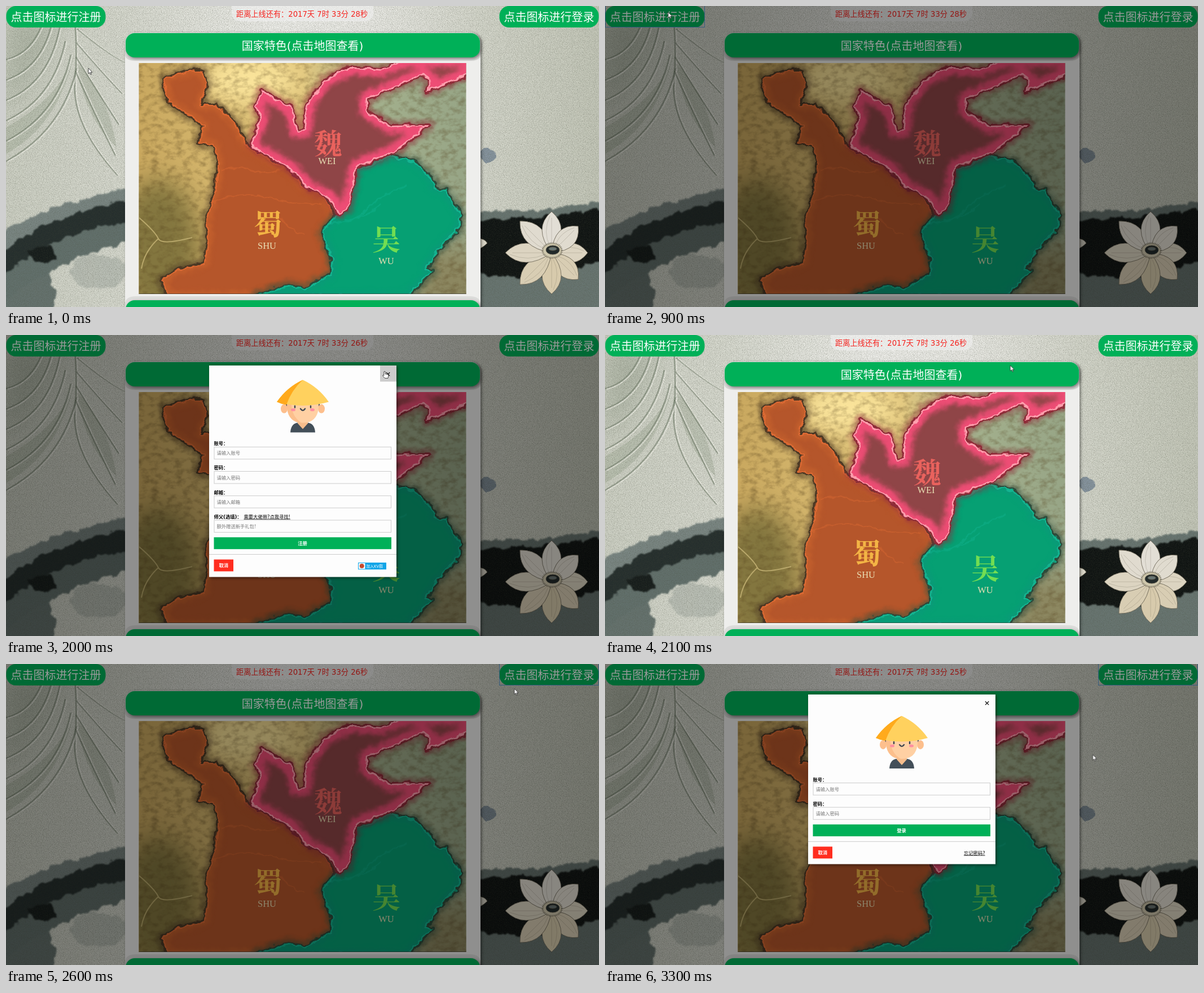
Recreate the animation shown at these times as an HTML page. Size 1051 by 533 pixels, loop 3.5 s.

```html
<!DOCTYPE html>
<html lang="zh-CN">
<head>
<meta charset="utf-8">
<title>三国</title>
<style>
html,body{margin:0;width:100%;height:100%;overflow:hidden;background:#c9cac2}
svg{display:block;width:100%;height:100%}
text{font-family:"DejaVu Sans","Noto Sans CJK SC","Noto Sans CJK",sans-serif}
.big{font-size:20px;fill:#fff}
.mid{text-anchor:middle}
.clock{font-size:13.2px;fill:#f5231f}
.form text{font-size:8.3px}
.form .b{font-weight:bold}
.form .hint{fill:#777}
.form .on{fill:#fff;text-anchor:middle}
.form .link{text-decoration:underline}
.glyph{font:bold 50px "Noto Serif CJK SC","Noto Sans CJK SC","Noto Sans CJK",serif;text-anchor:middle}
.latin{font:16.5px "Liberation Serif",serif;text-anchor:middle;fill:#e9dfb4}
</style>
</head>
<body>
<svg viewBox="0 0 1051 533" color-interpolation-filters="sRGB">
<defs>
  <linearGradient id="paper">
    <stop offset="0" stop-color="#cfd2c6"/><stop offset=".2" stop-color="#d9dbd1"/>
    <stop offset=".45" stop-color="#f0f0ec"/><stop offset=".62" stop-color="#ebebe6"/>
    <stop offset=".8" stop-color="#d6d8cd"/><stop offset="1" stop-color="#c6c9bb"/>
  </linearGradient>
  <linearGradient id="land">
    <stop offset="0" stop-color="#c9a85f"/><stop offset=".5" stop-color="#e0c57c"/>
    <stop offset=".72" stop-color="#a3b08d"/><stop offset="1" stop-color="#97a586"/>
  </linearGradient>
  <filter id="grain" x="0" y="0" width="1" height="1">
    <feTurbulence type="fractalNoise" baseFrequency=".9" numOctaves="2" seed="4"/>
    <feColorMatrix values="0 0 0 0 .28  0 0 0 0 .3  0 0 0 0 .24  1.7 0 0 0 -.68"/>
  </filter>
  <filter id="ridges" x="0" y="0" width="1" height="1">
    <feTurbulence type="fractalNoise" baseFrequency=".07 .11" numOctaves="4" seed="9"/>
    <feColorMatrix values="0 0 0 0 .32  0 0 0 0 .24  0 0 0 0 .1  2 0 0 0 -.85"/>
  </filter>
  <filter id="rough">
    <feTurbulence type="fractalNoise" baseFrequency=".08" numOctaves="2" seed="3"/>
    <feDisplacementMap in="SourceGraphic" scale="10" xChannelSelector="R" yChannelSelector="G"/>
  </filter>
  <filter id="ink" filterUnits="userSpaceOnUse" x="-40" y="290" width="1140" height="290">
    <feTurbulence type="fractalNoise" baseFrequency=".06" numOctaves="4" seed="7"/>
    <feDisplacementMap in="SourceGraphic" scale="16" xChannelSelector="R" yChannelSelector="G"/>
    <feGaussianBlur stdDeviation="1"/>
  </filter>
  <filter id="soft" x="-.5" y="-.5" width="2" height="2"><feGaussianBlur stdDeviation="22"/></filter>
  <filter id="glow"><feGaussianBlur stdDeviation="4"/></filter>
  <filter id="card" x="-.1" y="-.2" width="1.2" height="1.5">
    <feDropShadow dy="2" stdDeviation="2.6" flood-opacity=".45"/>
  </filter>
  <clipPath id="frame"><path d="M235.5 101h580v409h-580z"/></clipPath>
</defs>

<rect width="1051" height="533" fill="url(#paper)"/>
<g id="leaf" fill="none"></g>
<g filter="url(#ink)" fill="none">
  <circle cx="25" cy="515" r="62" fill="#66736f"/>
  <ellipse cx="165" cy="470" rx="50" ry="30" fill="#aab1a9" opacity=".6"/>
  <path d="M-20 505Q70 425 230 388" stroke="#63716d" stroke-width="52"/>
  <path d="M-20 432Q70 368 230 341" stroke="#7b8784" stroke-width="38"/>
  <path d="M-20 472Q60 388 230 360" stroke="#252e2d" stroke-width="36"/>
  <ellipse cx="65" cy="440" rx="24" ry="14" fill="#161c1b"/>
  <path d="M820 362Q950 368 1080 342V560H820z" fill="#697672"/>
  <path d="M820 378Q950 382 1080 352V440Q950 500 820 468z" fill="#0f1312"/>
</g>
<circle cx="853" cy="265" r="13" fill="#8795a0" filter="url(#rough)"/>
<rect width="1051" height="533" filter="url(#grain)" opacity=".5"/>
<g id="lotus" stroke="#655f50" stroke-width=".8"></g>

<rect x="400" y="-14" width="251" height="41" rx="14" fill="#f1f1f0" opacity=".6"/>
<g id="clock"></g>

<rect x="211" y="47" width="630" height="500" rx="18" fill="#eeeeec" filter="url(#card)"/>
<path d="M211 78V88Q213 97 230 97H822Q839 97 841 88V78z" fill="#d6d6d4"/>
<path d="M211 532V526Q213 514 230 514H822Q839 514 841 526V532z" fill="#dcdcda"/>
<g fill="#00b058" filter="url(#card)">
  <rect x="212" y="48" width="628" height="43" rx="16"/>
  <rect x="212" y="521" width="628" height="43" rx="16"/>
</g>
<text class="big mid" x="525.5" y="77.5">国家特色(点击地图查看)</text>

<g clip-path="url(#frame)">
  <rect x="235" y="100" width="581" height="411" fill="url(#land)"/>
  <g filter="url(#soft)">
    <ellipse cx="430" cy="130" rx="85" ry="45" fill="#fae49b"/>
    <ellipse cx="270" cy="430" rx="75" ry="125" fill="#83763f"/>
    <ellipse cx="790" cy="490" rx="75" ry="65" fill="#8c8760"/>
    <ellipse cx="620" cy="115" rx="75" ry="15" fill="#dcc68a"/>
  </g>
  <rect x="235" y="100" width="581" height="411" filter="url(#ridges)" opacity=".4"/>
  <path d="M236 375Q265 400 270 412T330 410M270 412Q245 435 240 465" fill="none" stroke="#b9a86b" stroke-width="2"/>
  <g id="realms"></g>
  <path d="M235 510.2h581" stroke="#1d1a16" stroke-width="1.6"/>
</g>
<text class="glyph" x="571" y="262" fill="#e9625d">魏</text><text class="latin" x="569" y="280">WEI</text>
<text class="glyph" x="464" y="405" fill="#f3b445">蜀</text><text class="latin" x="462.5" y="430">SHU</text>
<text class="glyph" x="674" y="432" fill="#72dd52">吴</text><text class="latin" x="674" y="457">WU</text>

<g id="tabs"></g>
<rect id="shade" width="1051" height="533" fill="#000" fill-opacity=".4"/>
<g id="signup" class="form" style="transform-origin:526px 241.3px"></g>
<g id="login" class="form" style="transform-origin:526px 203.7px"></g>
<g id="pointer" fill="#fff" stroke="#222" stroke-width=".8">
  <path id="arrow" d="M0 0V9.8L2.3 7.8 4 11.3 5.5 10.6 3.9 7.3H7z"/>
  <path id="hand" d="M-1.2 1Q0-.6 1.2 1V5L5.5 5.8Q7 6.2 6.8 8L6 12.5H.5L-3.2 8.5Q-3.8 7-2.5 7L-1.2 8z"/>
</g>
</svg>
<script>
const LOOP = 3500, TICK = 100;
const $ = id => document.getElementById(id);
const repeat = (n, make) => Array.from({length: n}, (_, i) => make(i)).join('');

// rows: [ms, value]; each value holds until the next row
function hold(el, prop, rows) {
  const keys = rows.map(([ms, v]) => ({offset: ms / LOOP, [prop]: v, easing: 'steps(1, end)'}));
  keys.push({offset: 1, [prop]: rows.at(-1)[1]});
  el.animate(keys, {duration: LOOP, iterations: Infinity});
}
function sample(el, valueAt) {
  hold(el, 'transform', Array.from({length: LOOP / TICK}, (_, i) => [i * TICK, valueAt(i * TICK)]));
}
function show(el, ...spans) {
  const rows = spans[0][0] > 0 ? [[0, 0]] : [];
  for (const [from, to] of spans) {
    rows.push([from, 1]);
    if (to < LOOP) rows.push([to, 0]);
  }
  hold(el, 'opacity', rows);
}

// Hanging leaf: two fans of veins along one stem
const vein = d => `<path d="${d}" stroke="#75806f" stroke-width="2.4" opacity=".6"/>
  <path d="${d}" transform="translate(3 1)" stroke="#f2f3ea" stroke-width="2" opacity=".7"/>`;
$('leaf').innerHTML =
  '<path d="M0 20H95Q60 130 0 190z" fill="#8d9884" opacity=".45" filter="url(#soft)"/>' +
  '<path d="M122 80Q95 210 0 262V215Q100 160 122 80zM124 100Q180 150 196 250Q140 200 124 100z" fill="#8b9781" opacity=".3"/>' +
  vein('M118-5Q128 60 122 135T198 300') +
  repeat(6, i => vein(`M${75 + i * 10} ${i * 24 - 10}Q${60 + i * 8} ${80 + i * 28} 0 ${95 + i * 36}`)) +
  repeat(4, i => vein(`M${126 - i} ${40 + i * 25}Q${180 - i * 8} ${85 + i * 35} ${212 - i * 6} ${100 + i * 55}`));

// Lotus: eight petals, longer to the left and warmer below
$('lotus').innerHTML = repeat(8, i => {
  const angle = i * 45, a = angle * Math.PI / 180, len = 73 - 9 * Math.cos(a);
  return `<g transform="translate(967 437) rotate(${angle})" fill="hsl(42 ${27 + 8 * Math.sin(a)}% ${81 - 5 * Math.sin(a)}%)">
    <path d="M0 0Q${len * .6} -34 ${len} 0Q${len * .6} 34 0 0"/>
    <path d="M0 0H${len * .85}M12-3Q${len * .5}-16 ${len * .9}-3" fill="none" opacity=".3"/></g>`;
}) + `<path d="M841 412Q850 414 853 420Q847 426 841 429z" fill="#d9d5c6"/>
  <ellipse cx="968" cy="433" rx="17" ry="13" fill="#cfc8ad" stroke-dasharray="1 1.5" stroke-width="3"/>
  <ellipse cx="969" cy="432" rx="12" ry="8" fill="#222a2a"/>
  <ellipse cx="969" cy="430" rx="7" ry="3" fill="#687573"/>`;

// Map: key points only, the rough filter frays the coasts
const shu = `M278 128 325 114 345 113 357 135 345 175 372 175 405 205 428 248 478 279 500 283 525 318 562 336
  583 371 559 400 578 450 575 475 530 500 445 514H290L275 487 300 468 352 455 358 400 355 380 372 320 376 275
  368 245 340 243 350 212 288 170z`;
const wu = `M608 350 622 290 680 265 725 275 760 310 757 322 780 327 806 370 803 395 768 430 745 465 757 470
  710 514H440L500 495 530 500 575 475 578 450 559 400 583 373z`;
const wei = `M452 150 505 178 517 220 528 218 535 170 565 130 610 108 665 112 705 95H822V120L745 152 752 130
  738 122 640 165 640 185 680 212 750 211 690 258 622 285 606 360 590 369 572 340 535 322 505 290 433 248
  452 195 442 180z`;
function realm(id, d, fill, glow, line, edge, depth, rivers = '') {
  return `<clipPath id="${id}"><path d="${d}"/></clipPath>
    <g filter="url(#rough)" stroke-linejoin="round" fill="none">
      <path d="${d}" stroke="${edge}" stroke-width="16" opacity=".55" filter="url(#glow)"/>
      <path d="${d}" fill="${fill}" stroke="${edge}" stroke-width="6"/>
      <g clip-path="url(#${id})">
        <path d="${d}" stroke="${glow}" stroke-width="${depth}" filter="url(#glow)"/>
        <path d="${rivers}" stroke="${line}" stroke-width="2.5" opacity=".4"/>
        <path d="${d}" stroke="${line}" stroke-width="5"/>
      </g>
    </g>`;
}
$('realms').innerHTML =
  realm('shu', shu, '#b5562b', '#c4602d', '#dc6933', '#4b3824', 16,
    'M380 292Q410 280 440 292T500 280M365 350Q410 325 455 338T560 350M485 375Q505 400 530 405') +
  realm('wu', wu, '#06a073', '#0a9a78', '#13b591', '#2d4a3a', 15,
    'M560 385Q610 390 640 360T710 320M600 380Q640 375 665 350') +
  realm('wei', wei, '#8f4547', '#ee4d75', '#ffa0ae', '#8e2c38', 28);

// Corner buttons
function tab(id, x, label) {
  const box = fill => `<rect x="${x}" width="176" height="38" rx="17" fill="${fill}"/>`;
  const text = fill => `<text class="big" x="${x + 8}" y="26.5" style="fill:${fill}">${label}</text>`;
  return box('#00b058') + text('#fff') + `<g id="${id}Hover">${box('#ccc') + text('#000')}</g>
    <rect id="${id}Focus" x="${x}" y="-.5" width="176" height="38" fill="none" stroke="#5b9bd2"/>`;
}
$('tabs').innerHTML = tab('join', .5, '点击图标进行注册') + tab('enter', 874.5, '点击图标进行登录');

// Dialogs
const mirror = shape => shape + `<g transform="scale(-1 1)">${shape}</g>`;
const face = y => `<g transform="translate(526 ${y})">
  <path d="M-22 93Q-21 78-10 76H10Q21 78 22 93z" fill="#434f59"/>
  <path d="M-9 65H9V77L0 87-9 77z" fill="#f6bd8c"/>
  ${mirror('<path d="M0 32H30V52H0z" fill="#434f59"/><ellipse cx="33" cy="51" rx="6" ry="8" fill="#fdbf8d"/>')}
  <path d="M-28 38H28V50Q25 76 0 76T-28 50z" fill="#ffd0a3"/>
  <path d="M-28 38H-20Q-21 65-2 76Q-25 75-28 50z" fill="#fcbf8c"/>
  <path d="M0 0Q28 13 46 39Q0 52-46 39Q-28 13 0 0z" fill="#ffd15e"/>
  <path d="M0 0Q-20 18-29 44-38 43-46 39-28 13 0 0z" fill="#ffaa1c"/>
  ${mirror('<ellipse cx="17" cy="53" rx="4" ry="2.5" fill="#ff8fa0"/>')}
  <path d="M-14 46v3M14 46v3M-4 51Q0 57 4 51" fill="none" stroke="#3d4650" stroke-width="2.4" stroke-linecap="round"/>
</g>`;
const field = (y, label, hint) => `<text class="b" x="368.5" y="${y - 2.8}">${label}</text>
  <rect x="369" y="${y + .3}" width="313.5" height="21.5" fill="#fdfdfd" stroke="#ccc"/>
  <text class="hint" x="373.5" y="${y + 14.3}">${hint}</text>`;
function dialog(top, fields, action, extra) {
  const pitch = 43.2, foot = top + fields.length * pitch + 17.7;
  return `<rect x="360" y="54" width="332" height="${foot - 14}" fill="#fdfdfd" filter="url(#card)"/>
    <rect class="closeHover" x="663" y="54" width="29" height="28.5" fill="#ccc" opacity="0"/>
    <path d="M674 66.2l6.2 6.2m0-6.2l-6.2 6.2" stroke="#111" stroke-width="1.3"/>
    ${face(top - 118.4)}${fields.map((f, i) => field(top + i * pitch, ...f)).join('')}
    <rect x="368.5" y="${foot - 30.3}" width="314.5" height="21" fill="#00b058"/>
    <text class="on b" x="525.5" y="${foot - 16.8}">${action}</text>
    <path d="M360 ${foot}h332" stroke="#ccc"/>
    <rect x="368.5" y="${foot + 9}" width="34.5" height="21" fill="#ff2d1f"/>
    <text class="on b" x="385.7" y="${foot + 22.5}">取消</text>${extra}`;
}
const account = [['账号：', '请输入账号'], ['密码：', '请输入密码']];
$('signup').innerHTML = dialog(198,
  [...account, ['邮箱：', '请输入邮箱'], ['师父(选填)：', '额外赠送新手礼包!']], '注册',
  `<text class="link" x="421.5" y="324.7">需要大佬带?点我寻找!</text>
  <rect x="624" y="403" width="50" height="12.2" fill="#10a5e8"/><path d="M625 404h11.5v10.2h-11.5z" fill="#fff"/>
  <circle cx="630.7" cy="409.1" r="4" fill="#c5492c"/>
  <text x="638.5" y="411.7" fill="#fff" style="font-size:6.8px">加入KV群</text>`);
$('login').innerHTML = dialog(210.3, account, '登录', '<text class="link" x="636" y="337.6">忘记密码?</text>');

// Countdown
[0, 1000, 1800, 2700, LOOP].forEach((from, i, ticks) => {
  if (from === LOOP) return;
  $('clock').insertAdjacentHTML('beforeend',
    `<text class="clock" x="408" y="18.5">距离上线还有：2017天 7时 33分 ${28 - i}秒</text>`);
  show($('clock').lastChild, [from, ticks[i + 1]]);
});

// States
show($('joinHover'), [500, 900]);
show($('joinFocus'), [800, 2000]);
show($('enterHover'), [2400, 2600]);
show($('enterFocus'), [2500, LOOP]);
show($('shade'), [900, 2100], [2600, LOOP]);
show($('signup').querySelector('.closeHover'), [1700, 2100]);
show($('hand'), [500, 900], [1700, 2100], [2400, 2600]);
show($('arrow'), [0, 500], [900, 1700], [2100, 2400], [2600, LOOP]);

const clamp = p => Math.min(1, Math.max(0, p));
function zoom(el, start, duration, end) {
  sample(el, ms => `scale(${ms < end ? 1 - (1 - clamp((ms - start) / duration)) ** 2.3 : 0})`);
}
zoom($('signup'), 900, 500, 2100);
zoom($('login'), 2600, 400, LOOP);

// Pointer stops: [ms, x, y]
const stops = [[100, 146, 110], [600, 112, 11], [900, 112, 11], [1300, 572, 67], [1800, 671, 64],
  [2000, 671, 64], [2500, 907, 13], [2800, 889, 105], [3100, 864, 160], [LOOP, 865, 161]];
sample($('pointer'), ms => {
  const i = Math.max(1, stops.findIndex(s => s[0] >= ms));
  const [t0, x0, y0] = stops[i - 1], [t1, x1, y1] = stops[i], k = clamp((ms - t0) / (t1 - t0));
  return `translate(${x0 + (x1 - x0) * k}px,${y0 + (y1 - y0) * k}px)`;
});
</script>
</body>
</html>
```
